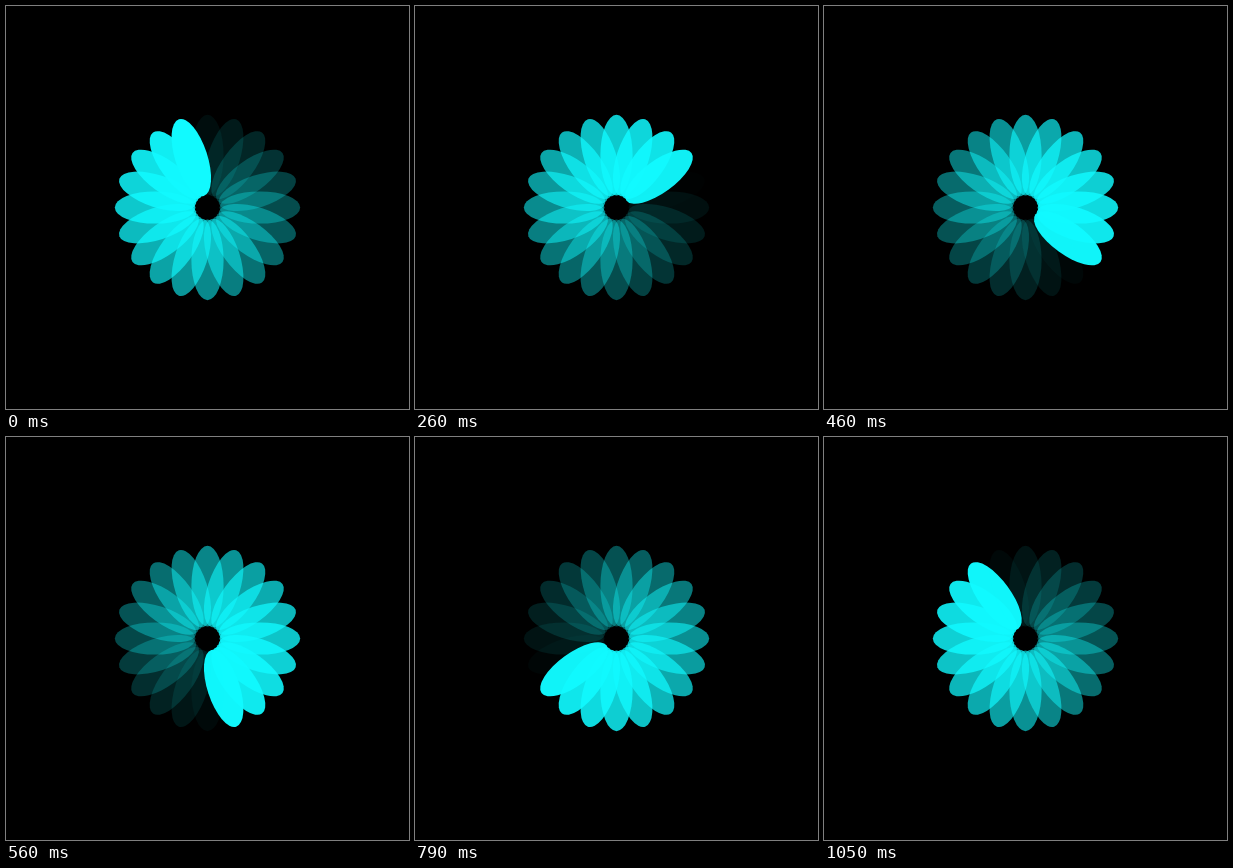
An HTML page that plays this animation: 403 by 403 pixels, repeating every 1090 ms.

```html
<!DOCTYPE html>
<html lang="en">
<head>
<meta charset="utf-8">
<title>Petal spinner</title>
<style>
  html, body { margin: 0; width: 100%; height: 100%; overflow: hidden; background: #000; }
  svg { display: block; width: 100vw; height: 100vh; }
</style>
</head>
<body>
<svg id="stage" viewBox="0 0 100 100" fill="#11faff"></svg>
<script>
  const LOOP = 1090;
  const STEPS = 33;
  const STEP_MS = 32.95;
  const PETALS = 20;
  const stage = document.getElementById('stage');

  function makePetal(i) {
    const petal = document.createElementNS('http://www.w3.org/2000/svg', 'ellipse');
    const attrs = {
      cx: 50, cy: 37, rx: 4, ry: 10,
      transform: `rotate(${i * 360 / PETALS} 50 50)`
    };
    for (const key in attrs) petal.setAttribute(key, attrs[key]);
    return stage.appendChild(petal);
  }

  const petals = Array.from({ length: PETALS }, (_, i) => makePetal(i));

  // Step changes fall on multiples of 10 ms.
  function stepAt(ms) {
    return Math.floor((Math.floor(ms / 10) * 10 + 5) / STEP_MS);
  }

  // Each petal lights up as the head passes, then fades evenly over one turn.
  function draw(ms) {
    const head = stepAt(ms % LOOP) / STEPS * PETALS - 1;
    petals.forEach((petal, i) => {
      const age = (head - i + 2 * PETALS) % PETALS;
      petal.setAttribute('opacity', (1 - age / PETALS).toFixed(4));
    });
  }

  const start = performance.now();
  function tick() {
    draw(performance.now() - start);
    requestAnimationFrame(tick);
  }
  tick();
</script>
</body>
</html>
```
